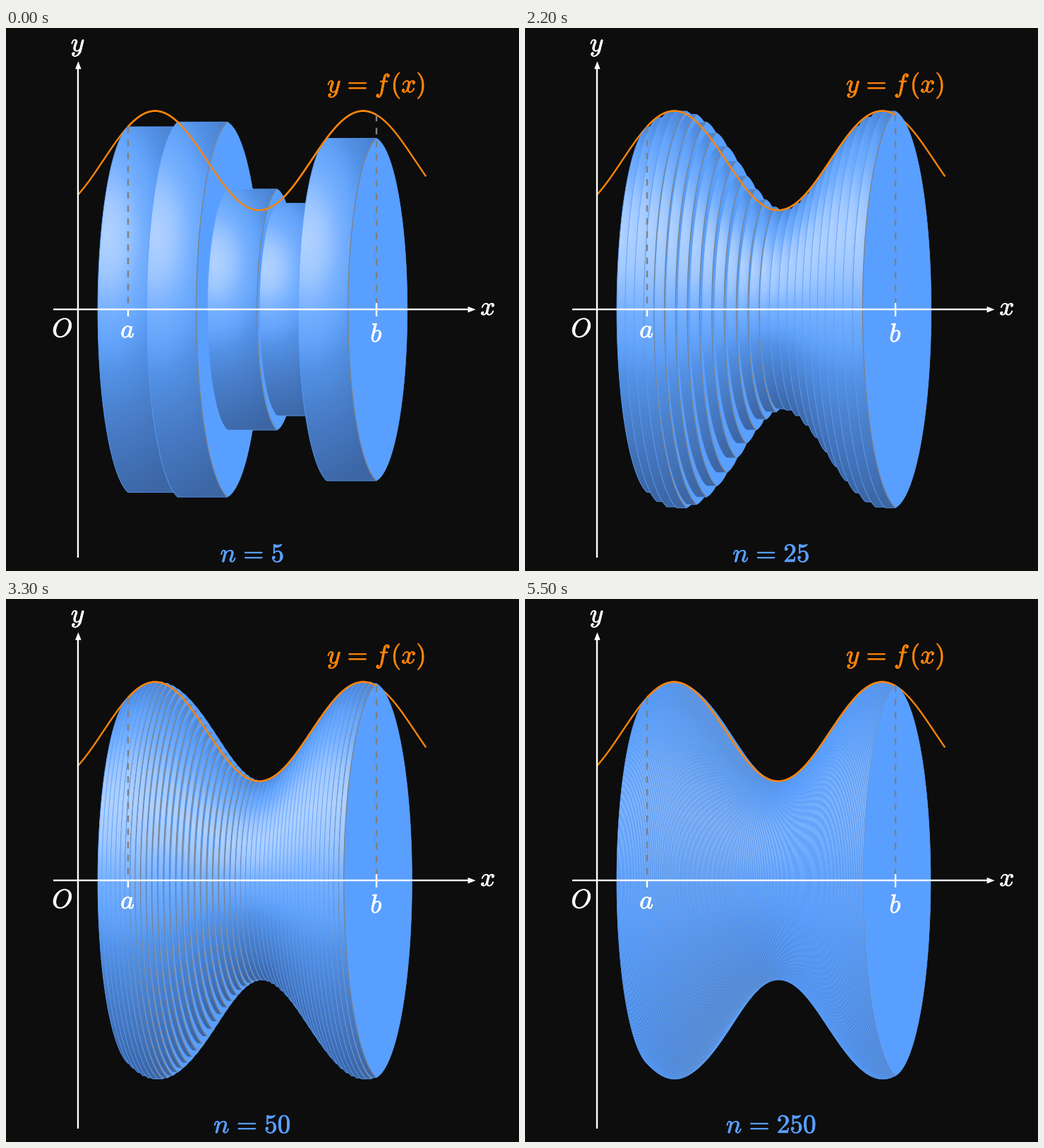
These frames come from a looping animation (727x770 px, 6600 ms). A matplotlib script:

```python
import numpy as np
import matplotlib.pyplot as plt
from matplotlib.animation import ArtistAnimation
from matplotlib.patches import PathPatch, Polygon
from matplotlib.path import Path
from matplotlib.patheffects import withStroke

plt.rcParams["mathtext.fontset"] = "cm"

W, H, DPI = 727, 770, 100
OX, OY, UNIT = 102.4, 399.2, 70.4
A, B = 1, 6
COUNTS = [5, 10, 25, 50, 100, 250]
INTERVAL = 1100

BG = "#0d0d0d"
BLUE = "#599fff"
ORANGE = "#ff8408"
GRAY = "#808080"
WHITE = "white"

THICK = 2.4
DASH = 9.28
FONT = 37.2

# half widths of a disk's rim relative to its radius, and how pointed it is
LEFT, LEFT_TIP = 0.165, 0.18
RIGHT, RIGHT_TIP = 0.181, 0.1

# shade against distance from the highlight
STOPS = [0, 0.2, 0.42, 0.6, 0.75, 1.0, 1.25, 1.5]
SHADES = np.array([
    (178, 211, 255), (160, 200, 255), (118, 176, 255), (98, 163, 250),
    (84, 146, 230), (74, 128, 204), (67, 114, 184), (60, 102, 164),
]) / 255


def f(x):
    return 3 + np.sin(1.5 * (x - 0.5))


def px(x):
    return OX + UNIT * x


def py(y):
    return OY - UNIT * y


def pt(pixels):
    return pixels * 72 / DPI


fig = plt.figure(figsize=(W / DPI, H / DPI), dpi=DPI, facecolor=BG)
ax = fig.add_axes([0, 0, 1, 1])
ax.set_xlim(0, W)
ax.set_ylim(H, 0)
ax.axis("off")


def line(x, y, color, width, z, **kw):
    kw.setdefault("solid_capstyle", "butt")
    return ax.plot(x, y, color=color, lw=pt(width), zorder=z, **kw)[0]


def label(x, y, text, color=WHITE):
    bolder = withStroke(linewidth=pt(0.8), foreground=color)
    return ax.text(x, y, f"${text}$", color=color, fontsize=pt(FONT),
                   ha="center", va="baseline", zorder=9,
                   path_effects=[bolder])


def equals(left, right):
    gap = r"\hspace{0.116}"
    return f"{left}{gap}={gap}{right}"


def make_shading():
    v, u = np.mgrid[1:-1:120j, -1:1:48j]
    d = np.hypot(0.45 * (u + 0.8), v - 0.4)
    return np.dstack([np.interp(d, STOPS, SHADES[:, k]) for k in range(3)])


def rim(x, r, side):
    """Top-to-bottom arc of a disk edge; side is -1 for left, 1 for right."""
    width, tip = (LEFT, LEFT_TIP) if side < 0 else (RIGHT, RIGHT_TIP)
    end = np.arccos(tip)
    t = np.linspace(end, -end, 61)
    bulge = (np.cos(t) - tip) / (1 - tip)
    return np.column_stack([x + side * width * r * bulge,
                            OY - r * np.sin(t) / np.sin(end)])


SHADING = make_shading()


def disk(x0, x1, r, n):
    back, front = rim(x0, r, -1), rim(x1, r, -1)
    body = np.vstack([[x1, OY - r], back, [x1, OY + r]])
    image = ax.imshow(SHADING, extent=(x0 - LEFT * r, x1, OY + r, OY - r),
                      aspect="auto", interpolation="bilinear", zorder=3)
    image.set_clip_path(Path(body), ax.transData)
    outline = np.vstack([front, rim(x1, r, 1)[::-1]])
    face = ax.add_patch(PathPatch(Path(outline), fc=BLUE, ec=BLUE,
                                  lw=pt(0.6), zorder=3))
    seam = line(*front.T, GRAY, np.clip(100 / n, 0.35, 1.24), 3)
    edge = line(*body.T, BLUE, 0.8, 3)
    return [image, face, seam, edge]


def solid(n):
    xs = np.linspace(A, B, n + 1)
    parts = []
    for x0, x1 in zip(xs[:-1], xs[1:]):
        parts += disk(px(x0), px(x1), UNIT * f(x0), n)
    parts.append(label(349, 757, equals("n", n), BLUE))
    return parts


def curve(lo, hi, z):
    x = np.linspace(lo, hi, 300)
    line(px(x), py(f(x)), ORANGE, THICK, z)


def arrow_head(x, y, dx, dy):
    size, half = 11, 4.3
    bx, by = x - size * dx, y - size * dy
    pts = [(x, y), (bx + half * dy, by + half * dx),
           (bx - half * dy, by - half * dx)]
    ax.add_patch(Polygon(pts, fc=WHITE, lw=0, zorder=7))


# the curve runs behind the solid, and over it between the bounds
curve(0, 7, 2)
curve(A, B, 4)

for x in (A, B):
    line([px(x)] * 2, [py(f(x)), OY], GRAY, THICK, 5,
         dashes=(DASH / THICK, DASH / THICK), dash_capstyle="butt")

line([px(-0.5), px(8) - 9], [OY, OY], WHITE, THICK, 6)
line([OX, OX], [py(-5), py(5) + 9], WHITE, THICK, 6)
arrow_head(px(8), OY, 1, 0)
arrow_head(OX, py(5), 0, -1)
line([px(A)] * 2, [OY, OY + 9.5], WHITE, THICK, 6)
line([px(B)] * 2, [OY - 9.5, OY + 9.5], WHITE, THICK, 6)

label(102, 33, "y")
label(683, 407, "x")
label(80, 438, "O")
label(172.5, 439, "a")
label(525, 445, "b")
label(524.5, 91, equals("y", r"f\hspace{0.14}(x)"), ORANGE)

frames = [solid(n) for n in COUNTS]
anim = ArtistAnimation(fig, frames, interval=INTERVAL, repeat=True,
                       repeat_delay=0, blit=False)
plt.show()
```
